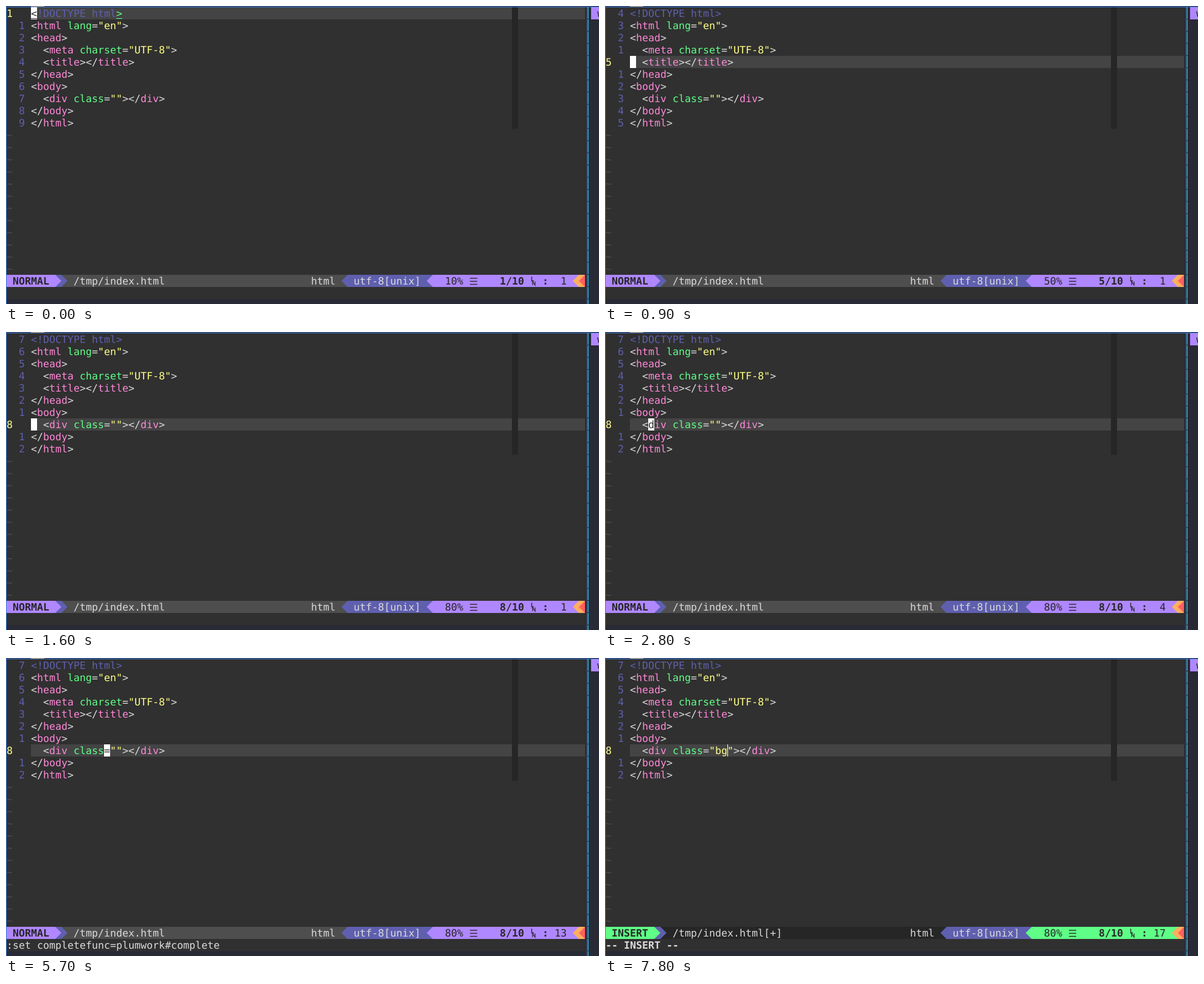
Animation of 974 by 490 pixels, one loop 8000 ms. Source, as an HTML page:

```html
<!DOCTYPE html>
<html lang="en">
<head>
<meta charset="UTF-8">
<title>Editor session</title>
<style>
  html, body { margin: 0; width: 100%; height: 100%; overflow: hidden; background: #282a36; }
  svg { display: block; width: 974px; height: 490px; }
  text {
    font: 16.61px "DejaVu Sans Mono", monospace;
    white-space: pre;
    text-rendering: geometricPrecision;
    font-variant-ligatures: none;
  }
  .b { font-weight: bold; }
</style>
</head>
<body>
<svg id="stage" viewBox="0 0 974 490"></svg>
<script>
const LOOP = 8000, CELL = 10, ROW = 20;
const C = {
  bg: '#303030', pane: '#282a36', line: '#444444', dark: '#262626', mid: '#4e4e4e',
  fg: '#dadada', pink: '#ff87d7', green: '#5fff87', yellow: '#ffff87',
  purple: '#af87ff', indigo: '#5f5faf', orange: '#ffaf5f', red: '#ff5f5f',
  blue: '#3f7fe0', teal: '#3a93b5', white: '#ffffff'
};
const CODE = [
  '<!DOCTYPE html>',
  '<html lang="en">',
  '<head>',
  '  <meta charset="UTF-8">',
  '  <title></title>',
  '</head>',
  '<body>',
  '  <div class=""></div>',
  '</body>',
  '</html>'
];

// Each step changes part of the editor state from its time on.
const STEPS = [
  [0, { row: 1, col: 1, insert: false, typed: '', msg: '', keys: '', blink: false }],
  [300, { row: 2 }], [500, { row: 3 }], [700, { row: 4 }], [900, { row: 5 }],
  [1100, { row: 6 }], [1400, { row: 7 }], [1600, { row: 8 }],
  [1900, { col: 2 }], [2100, { col: 3 }], [2800, { col: 4 }],
  [3300, { keys: '\\' }], [3500, { keys: '\\t' }],
  [3700, { keys: '', msg: ':set completefunc=plumwork#complete' }],
  [4800, { col: 5 }],
  [5400, { keys: 'f' }], [5500, { keys: '', col: 8 }],
  [5600, { keys: 'f' }], [5700, { keys: '', col: 13 }],
  [6000, { col: 14 }], [6300, { col: 15 }],
  [6700, { insert: true, msg: '-- INSERT --' }],
  [7500, { blink: true }],
  [7700, { blink: false, typed: 'b', col: 16 }],
  [7800, { typed: 'bg', col: 17 }]
];

const stage = document.getElementById('stage');
const colX = c => 31 + CELL * c;
const rowY = r => 2 + ROW * (r - 1);
const esc = s => s.replace(/&/g, '&amp;').replace(/</g, '&lt;').replace(/>/g, '&gt;');
const rect = (x, y, w, h, fill) =>
  `<rect x="${x}" y="${y}" width="${w}" height="${h}" fill="${fill}"/>`;
const path = (d, fill) => `<path d="${d}" fill="${fill}"/>`;
const stroke = (d, color, w) => `<path d="${d}" fill="none" stroke="${color}" stroke-width="${w}"/>`;
const span = (s, fill) => `<tspan fill="${fill}">${esc(s)}</tspan>`;
// y is the top of the text row
const text = (x, y, s, fill, bold) =>
  `<text x="${x}" y="${y + 16}" fill="${fill}"${bold ? ' class="b"' : ''}>${esc(s)}</text>`;
const right = (x, y) => `M${x} ${y}l10 10l-10 10z`;
const left = (x, y) => `M${x + 10} ${y}l-10 10l10 10z`;

function highlight(s) {
  if (s.startsWith('<!')) return span(s, C.indigo);
  return s.replace(/(<\/?)(\w+)|("[^"]*")|(\w+)(?==)|([^<"\w]+)/g,
    (all, open, tag, str, attr) =>
      open ? span(open, C.fg) + span(tag, C.pink)
        : span(all, str ? C.yellow : attr ? C.green : C.fg));
}

function stateAt(t) {
  const s = {};
  for (const [at, change] of STEPS) if (t >= at) Object.assign(s, change);
  return s;
}

function frameParts() {
  let out = rect(0, 0, 974, 490, C.pane) + rect(1, 2, 950, 480, C.bg);
  out += rect(0, 1, 974, 1, C.blue) + rect(0, 1, 1, 489, C.blue) + rect(41, 0, 22, 1, '#d79a4a');
  out += rect(953, 2, 1, 488, '#36506f');
  for (let y = 2; y < 490; y += ROW) out += rect(955, y, 2, 19, C.teal);
  out += rect(961, 2, 13, 20, C.purple) + text(971, 2, 'w', C.dark);
  for (let r = 11; r <= 22; r++) out += text(1, rowY(r), '~', C.mid);
  return out;
}

function codeParts(s) {
  const lines = CODE.slice();
  lines[7] = lines[7].replace('""', `"${s.typed}"`);
  const y = rowY(s.row), x = colX(s.col), line = lines[s.row - 1];
  let out = rect(41, y, 910, ROW, C.line) + rect(831, 2, 10, 200, C.dark);
  lines.forEach((l, i) => {
    const r = i + 1, top = rowY(r);
    out += r === s.row ? text(1, top, String(r), C.yellow)
      : text(21, top, String(Math.abs(r - s.row)), C.indigo);
    out += `<text x="41" y="${top + 16}">${highlight(l)}</text>`;
  });
  if (s.insert) return out + (s.blink ? '' : rect(x, y, 1, ROW, C.white));

  const ch = line[s.col - 1];
  out += rect(x, y, CELL, ROW, C.white) + text(x, y, ch, C.bg);
  if (ch === '<') {
    const end = line.indexOf('>', s.col), mx = colX(end + 1);
    out += rect(x, y + 18, CELL, 1, C.bg);
    out += rect(mx, y, CELL, ROW, C.line) + text(mx, y, '>', C.green);
    out += rect(mx, y + 18, CELL, 1, C.green);
  }
  return out;
}

function statusParts(s) {
  const y = 442, main = s.insert ? C.green : C.purple;
  let out = rect(1, y, 950, ROW, s.typed ? C.dark : C.mid);
  out += rect(1, y, 80, ROW, main) + rect(81, y, 10, ROW, C.indigo);
  out += path(right(81, y), main) + path(right(91, y), C.indigo);
  out += text(11, y, s.insert ? 'INSERT' : 'NORMAL', C.dark, true);
  out += text(111, y, '/tmp/index.html' + (s.typed ? '[+]' : ''), C.fg);
  out += text(501, y, 'html', C.fg);
  out += path(left(551, y), C.indigo) + rect(561, y, 140, ROW, C.indigo);
  out += text(571, y, 'utf-8[unix]', C.fg);
  out += path(left(691, y), main) + rect(701, y, 240, ROW, main);
  out += text(721, y, s.row * 10 + '%', C.dark);
  for (const dy of [5, 10, 15]) out += rect(762, y + dy, 12, 1.3, C.dark);
  out += text(811, y, s.row + '/10', C.dark, true);
  out += stroke('M863.5 445v7h3.5', C.dark, 1.3) + stroke('M865 459v-6l4 6v-6', C.dark, 1.2);
  out += text(881, y, ':', C.dark, true);
  out += text(901, y, String(s.col).padStart(2), C.dark);
  out += path(left(931, y), C.orange) + rect(941, y, 10, ROW, C.orange) + path(left(941, y), C.red);
  return out;
}

const commandParts = s => text(1, 462, s.msg, C.fg, s.insert) + text(841, 462, s.keys, C.fg);

const backdrop = frameParts();
let shown = '';
function draw(t) {
  const s = stateAt(t), key = JSON.stringify(s);
  if (key === shown) return;
  shown = key;
  stage.innerHTML = backdrop + codeParts(s) + statusParts(s) + commandParts(s);
}

const start = performance.now();
function tick() {
  draw((performance.now() - start) % LOOP);
  requestAnimationFrame(tick);
}
tick();
</script>
</body>
</html>
```
